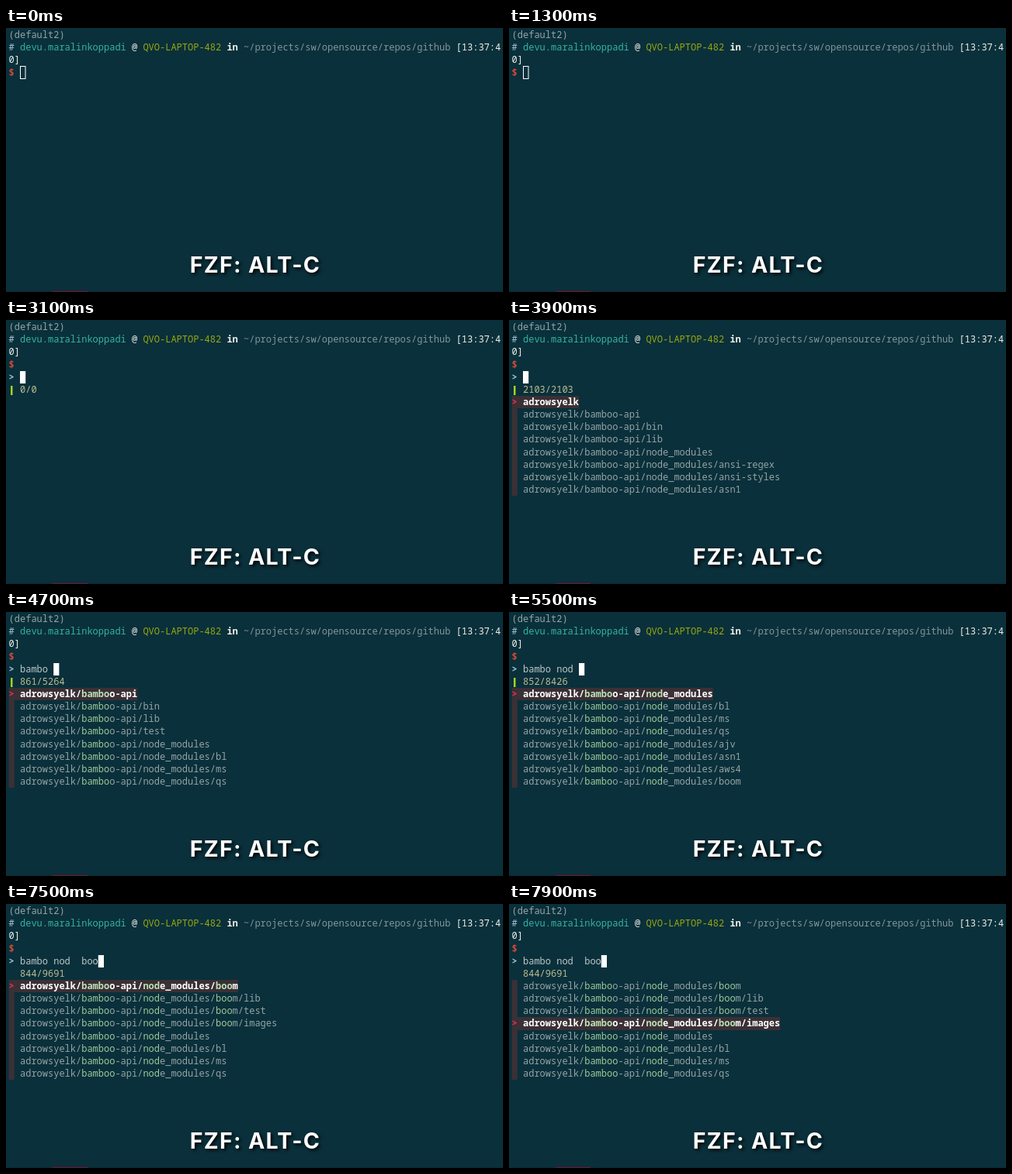
An HTML page with a canvas for the animation above (8000 ms loop, 640 px wide and 341 px high).

```html
<!DOCTYPE html>
<html lang="en">
<head>
<meta charset="utf-8">
<title>FZF: ALT-C</title>
<style>
  html, body { margin: 0; width: 100%; height: 100%; overflow: hidden; background: #0a303b; }
  canvas { display: block; width: 640px; height: 341px; }
</style>
</head>
<body>
<canvas id="stage" width="640" height="341"></canvas>
<script>
const ctx = document.getElementById("stage").getContext("2d");
const LOOP = 8000, STEP = 100;
const CELL = 7.2, LINE = 16.15, LEFT = 3.6;
const MONO = '12px "Noto Sans Mono", "DejaVu Sans Mono", monospace';

const C = {
  back: "#0a303b", grey: "#95a4a5", path: "#84959c", user: "#35b39f", host: "#96a80f",
  light: "#eef0e8", red: "#dc4a38", prompt: "#a3c6d6", typed: "#bcc7c7", info: "#bdbd92",
  spin: "#a5d020", pointer: "#e8305c", shade: "#3a3035", hit: "#9dca98", hitOn: "#bde0b7",
  white: "#ffffff"
};

// Moments of the session, in ms
const OPEN = 2400, LOAD = 3400, DONE = 5820;
const KEYS = "bambo nod  boo";
const KEY_TIMES = [4050, 4200, 4300, 4400, 4500, 4600, 5000, 5150, 5300, 5450, 5600, 6000, 6200, 6500];
const MOVES = [7600, 7700, 7800];
const COUNTS = [[LOAD, 0], [3900, 2103], [4700, 5264], [DONE, 9691]];

const ROOT = "adrowsyelk", API = ROOT + "/bamboo-api", MODS = API + "/node_modules";
const under = (base, names) => names.split(" ").map(n => base + "/" + n);
const SHORT = under(MODS, "bl ms qs");
const BOOM = [MODS + "/boom", ...under(MODS + "/boom", "lib test images")];
const LISTS = {
  all: [ROOT, API, ...under(API, "bin lib"), MODS, ...under(MODS, "ansi-regex ansi-styles asn1")],
  api: [API, ...under(API, "bin lib test"), MODS, ...SHORT],
  mods: [MODS, ...SHORT, ...under(MODS, "ajv asn1 aws4 boom")],
  bo: [...BOOM, ...under(MODS, "browser-stdout mocha/lib/browser nock/tests/browserify-public"), MODS],
  boo: [...BOOM, MODS, ...SHORT]
};

const colX = col => LEFT + col * CELL;
const rowTop = row => 1.1 + row * LINE;

function put(col, row, text, color, weight = 500) {
  ctx.font = weight + " " + MONO;
  ctx.fillStyle = color;
  ctx.fillText(text, colX(col), rowTop(row) + 12);
}

function box(col, row, cols, color) {
  const y = Math.round(rowTop(row));
  ctx.fillStyle = color;
  ctx.fillRect(colX(col), y, cols * CELL, Math.round(rowTop(row + 1)) - y);
}

function total(t) {
  if (t >= DONE) return COUNTS[3][1];
  for (let i = 1; i < COUNTS.length; i++) {
    const [t0, n0] = COUNTS[i - 1], [t1, n1] = COUNTS[i];
    if (t < t1) return Math.max(0, Math.round(n0 + (n1 - n0) * (t - t0) / (t1 - t0)));
  }
}

function matched(query, n) {
  const len = query.length;
  if (!len) return n;
  if (len < 5) return Math.round(n * (0.72 - 0.13 * len));
  if (len < 7) return 861;
  if (len < 12) return 852;
  return len < 14 ? 847 : 844;
}

function listFor(query) {
  const len = query.length;
  if (!len) return LISTS.all;
  if (len < 7) return LISTS.api;
  if (len < 12) return LISTS.mods;
  return len < 14 ? LISTS.bo : LISTS.boo;
}

// Positions of the letters that match the search terms
function hits(text, query) {
  const found = new Set();
  for (const term of query.split(" ").filter(Boolean)) {
    const m = text.match(new RegExp("/" + [...term].join("r?"))) || text.match(term);
    if (!m) continue;
    for (let i = 0; i < m[0].length; i++)
      if (term.includes(m[0][i])) found.add(m.index + i);
  }
  return found;
}

function entry(row, text, query, on) {
  box(0, row, on ? text.length + 2 : 1, C.shade);
  if (on) put(0, row, ">", C.pointer, 600);
  const found = hits(text, query);
  const weight = on ? 600 : 500;
  let start = 0;
  for (let i = 1; i <= text.length; i++) {
    if (i < text.length && found.has(i) === found.has(start)) continue;
    const color = found.has(start) ? (on ? C.hitOn : C.hit) : (on ? C.white : C.grey);
    put(start + 2, row, text.slice(start, i), color, weight);
    start = i;
  }
}

function header() {
  put(0, 0, "(default2)", C.grey);
  put(0, 1, "#", C.prompt);
  put(2, 1, "devu.maralinkoppadi", C.user);
  put(22, 1, "@", C.light);
  put(24, 1, "QVO-LAPTOP-482", C.host);
  put(39, 1, "in", C.light, 600);
  put(42, 1, "~/projects/sw/opensource/repos/github", C.path);
  put(80, 1, "[13:37:4", C.light);
  put(0, 2, "0]", C.light);
  put(0, 3, "$", C.red, 600);
}

function spinner() {
  ctx.fillStyle = C.spin;
  ctx.fillRect(6, 85, 2.5, 12);
}

function finder(t) {
  const query = KEYS.slice(0, KEY_TIMES.filter(k => t >= k).length);
  const n = total(t);
  put(0, 4, ">", C.prompt, 600);
  put(2, 4, query, C.typed);
  box(2 + query.length, 4, 1, C.white);
  if (t < DONE) spinner();
  put(2, 5, matched(query, n) + "/" + n, C.info);
  if (n === 0) return;
  const picked = MOVES.filter(m => t >= m).length;
  listFor(query).forEach((text, i) => entry(6 + i, text, query, i === picked));
}

function caption() {
  ctx.save();
  ctx.font = '700 28.5px Inter, "Open Sans", sans-serif';
  ctx.letterSpacing = "1.3px";
  ctx.textAlign = "center";
  ctx.shadowColor = "#000";
  ctx.shadowBlur = 4;
  ctx.shadowOffsetX = 2;
  ctx.shadowOffsetY = 2;
  ctx.fillStyle = C.white;
  ctx.fillText("FZF: ALT-C", 321, 316);
  ctx.restore();
}

function draw(t) {
  ctx.fillStyle = C.back;
  ctx.fillRect(0, 0, 640, 341);
  header();
  if (t < OPEN) {
    ctx.strokeStyle = C.white;
    ctx.lineWidth = 1;
    ctx.strokeRect(18.5, 49.5, 6.5, 16);
  } else {
    finder(t);
  }
  ctx.fillStyle = "#0c2a34";
  ctx.fillRect(0, 340, 640, 1);
  ctx.fillStyle = "#80102f";
  ctx.fillRect(60, 340, 45, 1);
  caption();
}

function tick() {
  const t = performance.now() % LOOP;
  draw(Math.floor(t / STEP) * STEP);
  requestAnimationFrame(tick);
}
tick();
</script>
</body>
</html>
```
